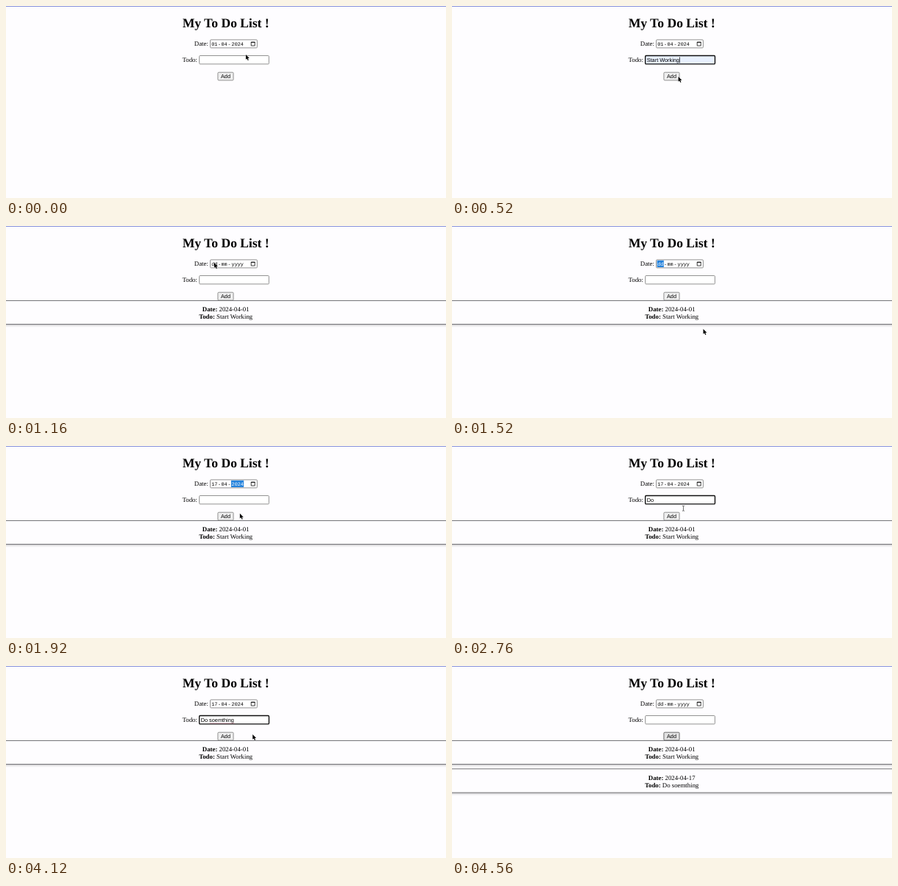
These frames come from a looping animation (600x261 px, 4.76 s). An HTML page:

```html
<!DOCTYPE html>
<html lang="en">
<head>
<meta charset="utf-8">
<title>My To Do List !</title>
<style>
  html, body { margin: 0; width: 100%; height: 100%; overflow: hidden; background: #fefdff; }
  svg { display: block; width: 100vw; height: 100vh; }
  text { white-space: pre; text-rendering: geometricPrecision; fill: #000; }
  .serif { font: 8.8px "Liberation Serif", "Times New Roman", serif; }
  .title { font-size: 17.6px; font-weight: bold; }
  .mid { text-anchor: middle; }
  .sans { font: 7.33px "Liberation Sans", Arial, sans-serif; }
  .mono { font: 6.8px "Liberation Mono", monospace; }
  .box { fill: #fff; stroke: #767676; stroke-width: .8; }
  .card { fill: #fefdff; stroke: #5c5c60; stroke-width: .8; filter: drop-shadow(0 1.2px 1.4px rgba(0, 0, 0, .28)); }
  .bold { font-weight: bold; }
</style>
</head>
<body>
<svg viewBox="0 0 600 261">
  <rect width="600" height="1" fill="#8792dc"/>
  <text class="serif title mid" x="299.8" y="29">My To Do List !</text>

  <text class="serif" x="256.8" y="54.2">Date:</text>
  <rect class="box" x="278.5" y="45.9" width="64" height="11" rx="1.2"/>
  <rect id="mark" y="46.8" height="9.2" fill="#2583dc"/>
  <g class="mono">
    <text id="day" x="280.2" y="53.7"/>
    <text x="288.9" y="53.7">-</text>
    <text id="month" x="293.4" y="53.7"/>
    <text x="302.6" y="53.7">-</text>
    <text id="year" x="307.6" y="53.7"/>
  </g>
  <path d="M334.3 49h5v5h-5zM334 49.5h5.6" fill="none" stroke="#111" stroke-width=".8"/>

  <text class="serif" x="240.5" y="75.6">Todo:</text>
  <rect id="field" class="box" x="263.6" y="67.5" width="95" height="11.4" rx="1.2"/>
  <text id="todo" class="sans" x="265.7" y="75.9"/>
  <path id="spell" d="M277.6 77.9q.5-.9 1 0t1 0 1 0 1 0 1 0 1 0 1 0 1 0 1 0 1 0 1 0 1 0 1 0 1 0 1 0 1 0 1 0 1 0 1 0 1 0 1 0 1 0 1 0 1 0 1 0 1 0 1 0 1 0 1 0 1 0 1 0 1 0 1 0 1 0" fill="none" stroke="#b4506a" stroke-width=".55"/>
  <rect id="caret" y="69.4" width=".7" height="8"/>

  <g id="cards"></g>
  <rect id="add" x="288.9" y="90.2" width="21.2" height="10.8" rx="1.2" stroke="#767676" stroke-width=".8"/>
  <text class="sans mid" x="299.5" y="98.1">Add</text>

  <path id="arrow" d="M0 0V6.8L1.6 5.4 2.7 8 3.9 7.5 2.8 5H4.9Z" stroke="#fff" stroke-width=".5" paint-order="stroke"/>
  <path id="beam" d="M-1.5-3.4H-.4L0-3 .4-3.4H1.5M0-3V3M-1.5 3.4H-.4L0 3 .4 3.4H1.5" fill="none" stroke="#333" stroke-width=".7"/>
</svg>
<script>
const LOOP = 4760, STEP = 40;
const $ = id => document.getElementById(id);
const show = (el, on) => el.setAttribute("visibility", on ? "visible" : "hidden");
const within = (t, ...spans) => spans.some(([a, b]) => t >= a && t < b);
const latest = (rows, t) => rows.filter(r => r[0] <= t).pop();

const BLANK = ["dd", "mm", "yyyy"];
// time, day, month, year, selected part
const dates = [
  [0, "01", "04", "2024"],
  [720, ...BLANK],
  [1200, ...BLANK, 0],
  [1600, "01", "mm", "yyyy", 0],
  [1640, "17", "mm", "yyyy", 1],
  [1720, "17", "04", "yyyy", 2],
  [1760, "17", "04", "0002", 2],
  [1800, "17", "04", "0020", 2],
  [1840, "17", "04", "0202", 2],
  [1880, "17", "04", "2024", 2],
  [1960, "17", "04", "2024"],
  [4440, ...BLANK]
];
const marks = [[279.6, 9.2], [292.8, 9.4], [307, 17.2]];

const phrase = "Do soemthing";
const typed = [[0, ""], [160, "Start Working"], [720, ""], [2280, "D"], [2480, "Do"],
  [2920, "Do "], [2960, "Do s"], [3000, "Do so"]];
for (let i = 0; i < 7; i++) typed.push([3160 + i * 86, phrase.slice(0, 6 + i)]);
typed.push([4440, ""]);

// pointer: time, x, y
const path = [[0, 327, 66], [80, 325, 70], [200, 314, 84], [320, 314, 84], [520, 308.6, 96],
  [640, 305, 96], [880, 304.6, 96], [1160, 284, 50], [1240, 284, 50], [1440, 337, 138],
  [1520, 342.6, 140], [1640, 342.6, 140], [1960, 315.5, 84.8], [3680, 315.5, 84.8],
  [3960, 341, 89], [4120, 336.3, 93], [4240, 334, 94], [4360, 304, 96], [4760, 304, 96]];

function pointAt(t) {
  const i = path.findIndex(p => p[0] > t), [t0, x0, y0] = path[i - 1], [t1, x1, y1] = path[i];
  const k = (t - t0) / (t1 - t0);
  return [x0 + (x1 - x0) * k, y0 + (y1 - y0) * k];
}

function card(y, date, todo) {
  const g = document.createElementNS("http://www.w3.org/2000/svg", "g");
  const line = (dy, label, value) =>
    `<text class="serif mid" x="299.7" y="${y + dy}"><tspan class="bold">${label}:</tspan> ${value}</text>`;
  g.innerHTML = `<rect class="card" x="-4" y="${y}" width="608" height="32.2"/>` +
    line(14.6, "Date", date) + line(24.8, "Todo", todo);
  $("cards").append(g);
  return g;
}
const first = card(101.4, "2024-04-01", "Start Working");
const second = card(139.9, "2024-04-17", phrase);

function draw(t) {
  const [, day, month, year, part] = latest(dates, t);
  [["day", day], ["month", month], ["year", year]].forEach(([id, value], i) => {
    $(id).textContent = value;
    $(id).style.fill = i === part ? "#fff" : "#000";
  });
  show($("mark"), part !== undefined);
  if (part !== undefined) {
    $("mark").setAttribute("x", marks[part][0]);
    $("mark").setAttribute("width", marks[part][1]);
  }

  const focus = within(t, [80, 680], [1960, 4400]);
  $("field").style.cssText = focus ? "stroke:#101010;stroke-width:1.4" : "";
  if (within(t, [160, 720])) $("field").style.fill = "#e8f0fe";
  $("todo").textContent = latest(typed, t)[1];
  $("caret").setAttribute("x", 265.8 + $("todo").getComputedTextLength());
  show($("caret"), within(t, [80, 680], [1960, 2760], [2920, 3720]));
  show($("spell"), within(t, [3720, 4440]));

  show(first, t >= 720);
  show(second, t >= 4440);

  const [x, y] = pointAt(t);
  const hover = x > 289 && x < 308 && y > 90 && y < 101;
  $("add").setAttribute("fill", hover ? "#e2e2e2" : "#efefef");
  $("add").setAttribute("stroke", hover ? "#4c4c4c" : "#767676");
  const beam = within(t, [80, 160], [1960, 3200], [3720, 3760]);
  show($("beam"), beam);
  show($("arrow"), !beam && !within(t, [3200, 3720], [4560, LOOP]));
  for (const id of ["arrow", "beam"]) $(id).setAttribute("transform", `translate(${x} ${y})`);
}

const start = performance.now();
function tick() {
  const t = (performance.now() - start) % LOOP;
  draw(Math.floor(t / STEP) * STEP);
  requestAnimationFrame(tick);
}
tick();
</script>
</body>
</html>
```
